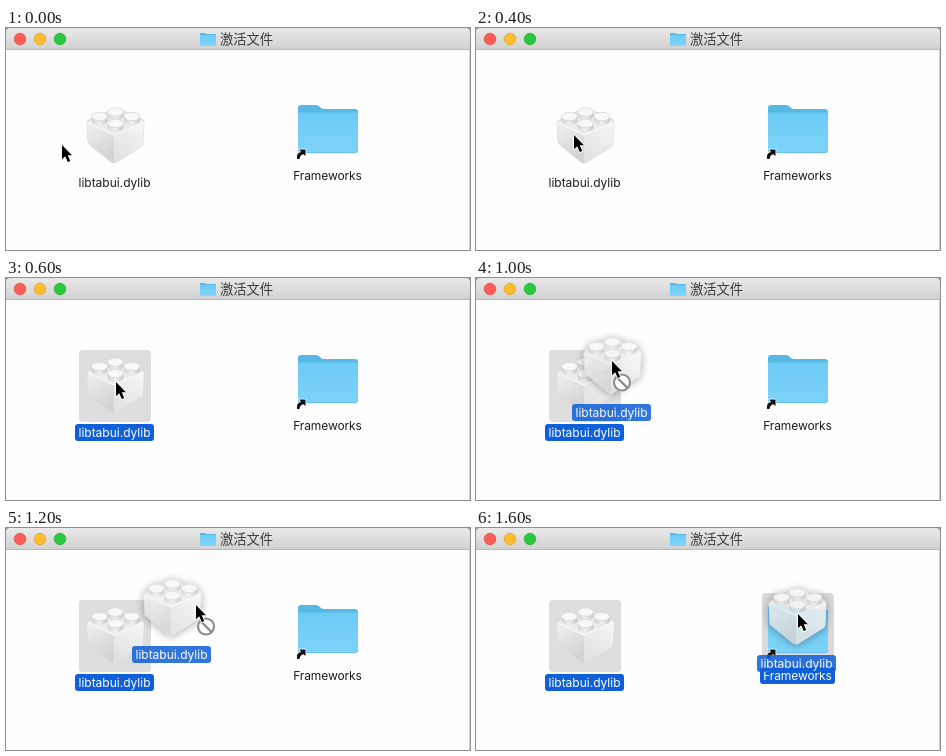
Write an HTML page that moves like this. It is 464 px wide and 222 px high and loops after 1800 ms.

```html
<!DOCTYPE html>
<html lang="zh-CN">
<head>
<meta charset="utf-8">
<title>激活文件</title>
<style>
  html, body { margin: 0; width: 100%; height: 100%; overflow: hidden; background: #fff; }
  svg { display: block; width: 100vw; height: 100vh; }
  text { font: 12px Inter, Roboto, sans-serif; text-anchor: middle; fill: #1c1c1c; }
  .title { font: 13.3px "Noto Sans CJK SC", "Noto Sans CJK", sans-serif; fill: #3d3d3d; }
  .pill { fill: #0f60d8; }
  .on { fill: #fff; }

  /* Nine poses of 200 ms each, with hard cuts between them. */
  .step { animation: 1800ms step-end infinite; }
  .picked { animation-name: picked; }
  .target { animation-name: target; }
  .ghost { animation-name: ghost; }
  .badge { animation-name: badge; }
  .cursor { animation-name: cursor; }

  @keyframes picked {
    0% { opacity: 0; }
    33.333%, 100% { opacity: 1; }
  }
  @keyframes target {
    0% { opacity: 0; }
    88.888%, 100% { opacity: 1; }
  }
  @keyframes badge {
    0% { opacity: 0; }
    55.555% { opacity: 1; }
    88.888%, 100% { opacity: 0; }
  }
  @keyframes ghost {
    0% { opacity: 0; transform: translate(0, 0); }
    55.555% { opacity: .86; transform: translate(27px, -20px); }
    66.666% { opacity: .86; transform: translate(57px, -28px); }
    77.777% { opacity: .86; transform: translate(131px, -36px); }
    88.888%, 100% { opacity: .86; transform: translate(212px, -19px); }
  }
  @keyframes cursor {
    0% { transform: translate(56px, 117px); }
    22.222% { transform: translate(98px, 107px); }
    33.333% { transform: translate(110px, 104px); }
    55.555% { transform: translate(136px, 83px); }
    66.666% { transform: translate(190px, 77px); }
    77.777% { transform: translate(296px, 69px); }
    88.888%, 100% { transform: translate(322px, 86px); }
  }
</style>
</head>
<body>
<svg viewBox="0 0 464 222" preserveAspectRatio="none">
  <defs>
    <linearGradient id="bar" x2="0" y2="1">
      <stop stop-color="#e9e9e9"/><stop offset="1" stop-color="#d1d1d1"/>
    </linearGradient>
    <linearGradient id="blue" x2="0" y2="1">
      <stop stop-color="#6ccbf6"/><stop offset="1" stop-color="#7dd3f9"/>
    </linearGradient>
    <linearGradient id="left" x2=".4" y2="1">
      <stop stop-color="#f0f0f0"/><stop offset="1" stop-color="#d3d3d3"/>
    </linearGradient>
    <linearGradient id="right" x1="1" x2=".4" y2="1">
      <stop stop-color="#f7f7f7"/><stop offset="1" stop-color="#e2e2e2"/>
    </linearGradient>
    <linearGradient id="side">
      <stop stop-color="#d2d2d2"/><stop offset=".5" stop-color="#f0f0f0"/><stop offset="1" stop-color="#c6c6c6"/>
    </linearGradient>
    <filter id="halo" x="-30%" y="-30%" width="160%" height="160%">
      <feDropShadow dx="0" dy="1" stdDeviation="4" flood-color="#000" flood-opacity=".4"/>
    </filter>

    <g id="stud">
      <path d="M-8 0v4a8 4.2 0 0 0 16 0v-4z" fill="url(#side)"/>
      <ellipse rx="8" ry="4.2" fill="#f8f8f8" stroke="#d0d0d0" stroke-width=".7"/>
    </g>
    <g id="brick">
      <path d="M81 95Q81 93 83 92L107 81Q110 80 113 81L136 91Q138 92 138 94L137 116Q137 118 135 119L111 134Q108 136 105 134L84 117Q82 116 82 113Z" fill="#e4e4e4" stroke="#d6d6d6" stroke-width=".8"/>
      <path d="M81 95L108 107V135Q106 135 105 134L84 117Q82 116 82 113Z" fill="url(#left)"/>
      <path d="M138 94L108 107V135Q110 135 111 134L135 119Q137 118 137 116Z" fill="url(#right)"/>
      <path d="M82 94L107 82Q110 81 113 82L137 93L108 106Z" fill="#ededed"/>
      <path d="M82 95L108 107L137 94" fill="none" stroke="#fff"/>
      <use href="#stud" x="109.5" y="84"/>
      <use href="#stud" x="93.5" y="88.5"/>
      <use href="#stud" x="126" y="88.5"/>
      <use href="#stud" x="109.5" y="95.5"/>
    </g>
    <g id="name">
      <rect class="pill" x="69" y="146" width="79" height="17" rx="3"/>
      <text class="on" x="108.5" y="159">libtabui.dylib</text>
    </g>
    <g id="folder">
      <path d="M292 80Q292 77 295 77H310Q312 77 313.500 78.500L315 80Q316 81 318 81H349Q352 81 352 84V122H292Z" fill="#57b8e6"/>
      <path d="M292 86Q292 84.500 294 84.500H350Q352 84.500 352 86V122Q352 125 349 125H295Q292 125 292 122Z" fill="url(#blue)"/>
      <path d="M292.500 122Q293 124.700 295 124.700H349Q351.500 124.700 351.700 122" fill="none" stroke="#5fb6df" stroke-width=".8"/>
    </g>
    <g id="alias">
      <path d="M291 131Q290 125 295 124L293.500 121.500H299.500V128L297.500 126.300Q294 127 293.500 131Z" fill="#111" stroke="#fff" stroke-width="1.400" paint-order="stroke"/>
    </g>
  </defs>

  <rect width="464" height="222" fill="#fefefe"/>
  <rect width="464" height="21.500" fill="url(#bar)"/>
  <rect y="21" width="464" height="1" fill="#b9b9b9"/>
  <rect x="463" y="22" width="1" height="200" fill="#d0d0d0"/>
  <path d="M0 0H4Q0 0 0 4ZM464 0H460Q464 0 464 4Z" fill="#8c8c8c"/>
  <g stroke-width=".7">
    <circle cx="14" cy="11" r="5.800" fill="#fc5d57" stroke="#e0463f"/>
    <circle cx="34" cy="11" r="5.800" fill="#fdbd2f" stroke="#dfa023"/>
    <circle cx="54" cy="11" r="5.800" fill="#2ac840" stroke="#1dac2c"/>
  </g>
  <use href="#folder" transform="translate(194 5) scale(.267 .26) translate(-292 -77)"/>
  <text class="title" x="240.500" y="16">激活文件</text>

  <text x="108.500" y="159">libtabui.dylib</text>
  <g class="step picked">
    <rect x="73" y="72" width="72" height="72" rx="4" fill="#dedede"/>
    <use href="#name"/>
  </g>
  <use href="#brick"/>

  <text x="321.500" y="152" textLength="none" letter-spacing="-.1">Frameworks</text>
  <g class="step target">
    <rect x="286" y="65" width="72" height="72" rx="4" fill="#dadada"/>
    <rect class="pill" x="284" y="139" width="75" height="17" rx="3"/>
    <text class="on" x="321.500" y="152" letter-spacing="-.1">Frameworks</text>
  </g>
  <use href="#folder"/>
  <use href="#alias"/>

  <g class="step ghost">
    <use href="#brick" filter="url(#halo)"/>
    <use href="#name"/>
  </g>

  <g class="step cursor">
    <g class="step badge" fill="none">
      <circle cx="10" cy="21.500" r="9.500" fill="#fff" fill-opacity=".85"/>
      <circle cx="10" cy="21.500" r="8" stroke="#8e8e8e" stroke-width="2.200"/>
      <path d="M4.400 15.900L15.600 27.100" stroke="#8e8e8e" stroke-width="2.200"/>
    </g>
    <path d="M0 0V14.200L3.200 11.200L5.800 17L8.200 16L5.700 10.300H10Z" fill="#000" stroke="#fff" stroke-width="1.800" paint-order="stroke" stroke-linejoin="round"/>
  </g>
</svg>
</body>
</html>
```
